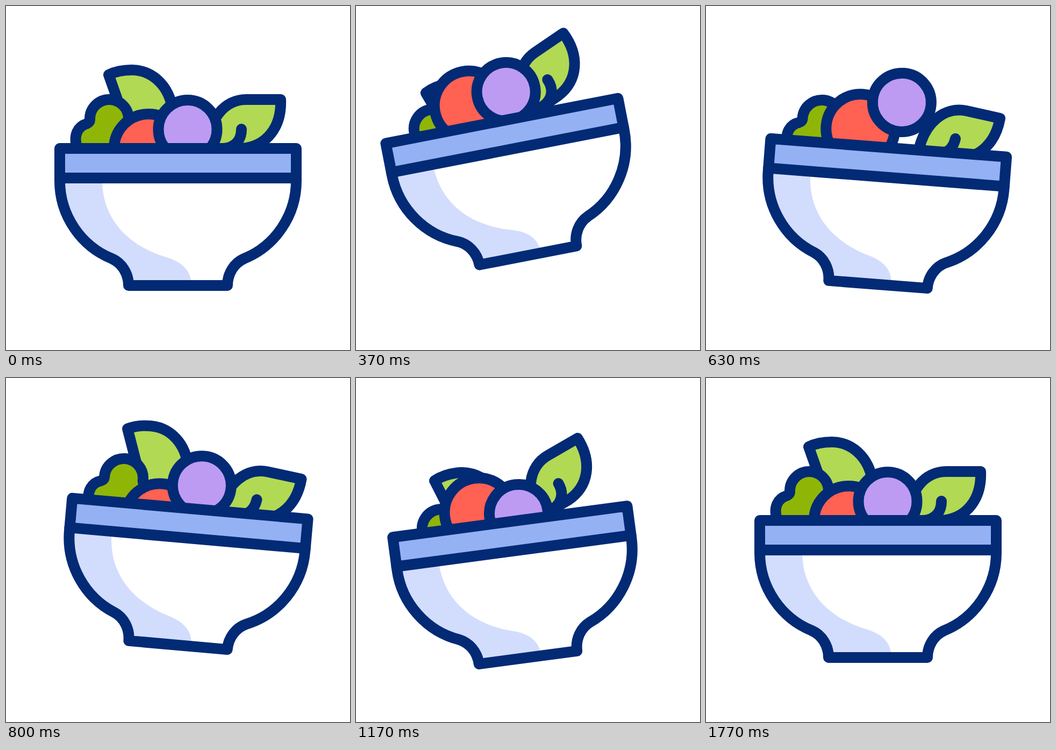
Write an HTML page that moves like this. It is 640x640 px and loops after 2000 ms.

```html
<!DOCTYPE html>
<html lang="en">
<head>
<meta charset="utf-8">
<title>Salad bowl</title>
<style>
  html, body { margin: 0; width: 100%; height: 100%; overflow: hidden; background: #fff; }
  svg { display: block; width: 100vw; height: 100vh; }
</style>
</head>
<body>
<svg viewBox="0 0 640 640">
  <defs>
    <path id="shell" d="M100 265V325C100 390 140 447 197 470C215 478 228 497 228 520H412C412 497 425 478 443 470C500 447 540 390 540 325V265Z"/>
    <clipPath id="inside"><use href="#shell"/></clipPath>
  </defs>
  <g id="bowl" stroke="#032a75" stroke-width="20" stroke-linecap="round" stroke-linejoin="round">
    <path id="leaf" fill="#b2d953" d="M191 128C205 121 220 119 234 119C276 119 310 155 310 205L300 264H239Z"/>
    <path id="sprout" fill="#8fb606" d="M132 262C125 240 134 224 150 219C157 216 156 213 156 210A36 36 0 0 1 228 210C228 213 227 216 234 219C250 224 259 240 252 262Q251 265 248 265H136Q133 265 132 262Z"/>
    <g id="blade">
      <path fill="#b2d953" d="M511 174H447C407 174 376 210 376 265H438C485 262 513 225 511 174Z"/>
      <path fill="none" d="M438 229C438 248 428 263 405 265"/>
    </g>
    <circle id="tomato" fill="#ff6152" cx="265" cy="265" r="64"/>
    <circle id="plum" fill="#bd9bf3" cx="338" cy="229.5" r="54.5"/>
    <use href="#shell" fill="#fff" stroke="none"/>
    <g clip-path="url(#inside)" stroke="none">
      <path fill="#d2ddfd" d="M90 320H179V330C182 398 228 447 300 468C326 476 341 490 344 510V530H90Z"/>
      <path fill="#94b1f3" d="M90 255H550V320H90Z"/>
    </g>
    <path fill="none" d="M100 320H540"/>
    <use href="#shell" fill="none"/>
  </g>
</svg>
<script>
const LOOP = 2000, FPS = 30;

// Tracks hold [frame, value] keys.
const tracks = {
  tilt:   [[0, 0], [11.2, -11], [19, 4.44], [21.7, 7.8], [28, -4.04], [32.5, -10.1], [35, -7.58], [40.5, 0]],
  lift:   [[0, 0], [9.2, -63], [11, -56], [19, -2], [20, 0], [26.3, -33], [28, -27.5], [33, 0], [41, 0], [47, 1], [53, 0]],
  leaf:   [[0, 0], [11, 59], [16, 78], [19, 74], [26, -18], [28, -10], [35, 43], [40, 68], [41, 67], [53, 0]],
  sprout: [[0, 0], [11, 45], [19, 12], [22, 6], [28, 24], [34, 52], [35, 51], [41, 15], [53, 0]],
  blade:  [[0, 0], [10, -25], [11, -23.3], [19, 8], [22, 10.5], [28, -7.8], [33, -24.5], [35, -22.5], [41, -5.5], [53, 0]],
  tomato: [[0, 0], [11, -40], [14, -50], [19, -31.5], [27, 42], [28, 40], [35, -24.6], [38, -35], [41, -22], [53, 0]],
  plum:   [[0, 0], [5, 10], [11, -16], [18, -52], [19, -50.5], [28, 25.5], [31.5, 37], [35, 23], [41, -30.5], [43, -35], [53, 0]]
};

// Smooth curve through the keys, flat at every turning point.
function slope(keys, i) {
  if (i === 0 || i === keys.length - 1) return 0;
  const rate = j => (keys[j + 1][1] - keys[j][1]) / (keys[j + 1][0] - keys[j][0]);
  const a = rate(i - 1), b = rate(i);
  return a * b > 0 ? 2 * a * b / (a + b) : 0;
}

function valueAt(keys, f) {
  const i = keys.findIndex(k => k[0] > f) - 1;
  if (i < 0) return keys[keys.length - 1][1];
  const [x0, y0] = keys[i], [x1, y1] = keys[i + 1];
  const h = x1 - x0, u = (f - x0) / h, v = 1 - u;
  return y0 * v * v * (1 + 2 * u) + y1 * u * u * (3 - 2 * u)
    + h * u * v * (v * slope(keys, i) - u * slope(keys, i + 1));
}

const place = (id, transform) => document.getElementById(id).setAttribute("transform", transform);

function draw(now) {
  const frame = Math.floor((now % LOOP + 5) * FPS / 1000) % (LOOP * FPS / 1000);
  const at = name => valueAt(tracks[name], frame);
  place("bowl", `translate(0 ${at("lift")}) rotate(${at("tilt")} 320 520)`);
  place("blade", `rotate(${at("blade")} 372 266)`);
  for (const id of ["leaf", "sprout", "tomato", "plum"]) place(id, `translate(0 ${at(id)})`);
}

const start = performance.now();
function tick() {
  draw(performance.now() - start);
  requestAnimationFrame(tick);
}
tick();
</script>
</body>
</html>
```
